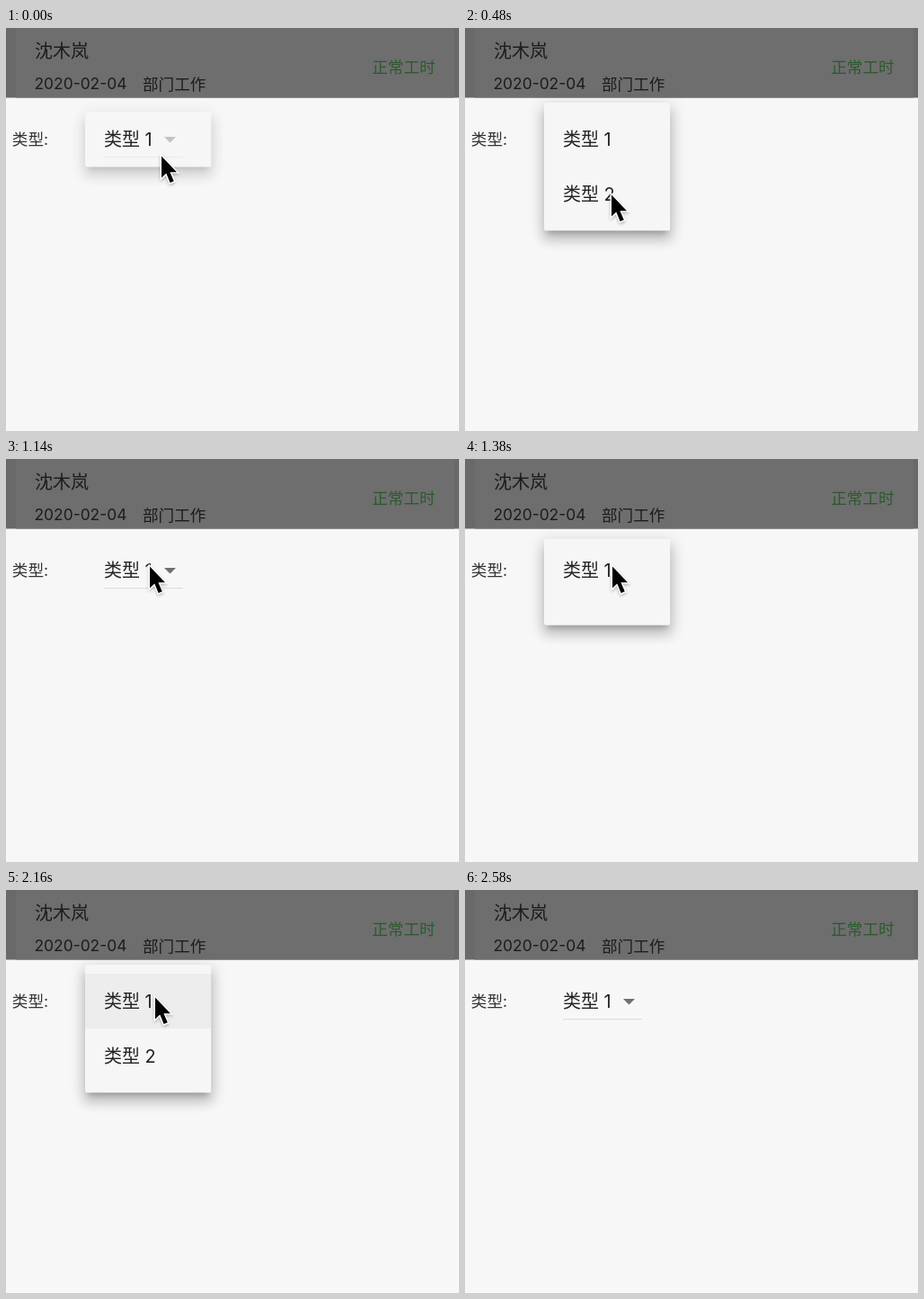
An HTML page for the animation above (2700 ms loop, 504 px wide and 448 px high).

```html
<!DOCTYPE html>
<html lang="zh-CN">
<head>
<meta charset="utf-8">
<title>Dropdown</title>
<style>
html, body { margin: 0; width: 100%; height: 100%; overflow: hidden; background: #f7f7f7; }
svg { display: block; width: 504px; height: 448px; }
text { font-family: Inter, "Noto Sans CJK SC", "Noto Sans CJK", sans-serif; white-space: pre; }
.item { font-size: 20px; fill: #222; }
.small { font-size: 17.6px; }
</style>
</head>
<body>
<svg viewBox="0 0 504 448">
  <defs>
    <filter id="near" filterUnits="userSpaceOnUse" x="40" y="40" width="240" height="250"><feGaussianBlur stdDeviation="3.2"/></filter>
    <filter id="mid" filterUnits="userSpaceOnUse" x="40" y="40" width="240" height="250"><feGaussianBlur stdDeviation="6.4"/></filter>
    <filter id="far" filterUnits="userSpaceOnUse" x="40" y="40" width="240" height="250"><feGaussianBlur stdDeviation="8.9"/></filter>
    <filter id="soft" x="-50%" y="-50%" width="200%" height="200%"><feDropShadow dx="0" dy="1.5" stdDeviation="1.4" flood-opacity=".3"/></filter>
    <clipPath id="clip"><rect id="clipBox" x="88" width="140.5" rx="2.5"/></clipPath>
  </defs>

  <rect width="504" height="448" fill="#f7f7f7"/>
  <rect width="504" height="77.5" fill="#696969"/>
  <rect x="11" width="488" height="77.5" fill="#6e6e6e"/>
  <text x="32" y="33.3" font-size="20" fill="#1c1c1c">沈木岚</text>
  <text x="31.5" y="68.3" font-size="17.4" fill="#1c1c1c">2020-02-04</text>
  <text class="small" x="152" y="69" fill="#1c1c1c">部门工作</text>
  <text class="small" x="407.2" y="50.2" fill="#2c5a2e">正常工时</text>

  <text class="small" x="6.8" y="130.4" fill="#333">类型:</text>
  <text class="item" x="109" y="131.2">类型 1</text>
  <path d="M176 121H189L182.5 127.5Z" fill="#6f6f6f"/>
  <rect x="109" y="143" width="88" height="1.2" fill="#dedede"/>

  <g id="menu">
    <rect class="shade" data-dy="6.3" data-grow="-3.8" opacity=".2" filter="url(#near)"/>
    <rect class="shade" data-dy="10.2" data-grow="1.3" opacity=".14" filter="url(#mid)"/>
    <rect class="shade" data-dy="3.8" data-grow="2.5" opacity=".12" filter="url(#far)"/>
    <g clip-path="url(#clip)">
      <rect x="88" y="83" width="140.5" height="142.5" fill="#f6f6f6"/>
      <rect id="glow1" x="88" y="93" width="140.5" height="61"/>
      <rect id="glow2" x="88" y="154" width="140.5" height="61"/>
      <text class="item" x="109" y="131.2">类型 1</text>
      <text class="item" id="second" x="109" y="192.2">类型 2</text>
    </g>
  </g>

  <g id="cursor" filter="url(#soft)">
    <path d="M1 1.5V25.5L6.3 20.6L10.6 31L14.8 29.2L10.4 19.2H18Z" stroke="#fff" stroke-width="2.6" paint-order="stroke"/>
  </g>
</svg>
<script>
const LOOP = 2700, STEP = 60;
const $ = id => document.getElementById(id);
const shades = [...document.querySelectorAll('.shade')];
const clamp = v => Math.min(1, Math.max(0, v));
const ramp = (v, a, b) => clamp((v - a) / (b - a));
const mix = (a, b, p) => a + (b - a) * p;
const ease = p => p * p * (3 - 2 * p);

// Pointer path: time, x, y
const path = [
  [0, 172, 141], [120, 172, 143], [420, 162, 184], [600, 162, 184],
  [840, 164, 127], [1140, 159, 118], [1260, 159, 118], [1500, 167, 118],
  [1920, 167, 118], [2160, 165, 118], [2280, 164, 121], [2400, 160, 161],
  [2460, 152, 272], [2520, 148, 398]
];

// Each opening: menu start, fade-out start
const opens = [{ start: -47, end: 960 }, { start: 1273, end: 2235 }];

function pointer(t) {
  const i = path.findIndex(k => k[0] > t);
  if (i < 0) return path[path.length - 1].slice(1);
  const [a, b] = [path[i - 1], path[i]];
  const p = ease(ramp(t, a[0], b[0]));
  return [mix(a[1], b[1], p), mix(a[2], b[2], p)];
}

function setBox(el, x, y, w, h) {
  Object.entries({ x, y, width: w, height: h }).forEach(([k, v]) => el.setAttribute(k, v));
}

function draw(t) {
  const { start, end } = t < 1200 ? opens[0] : opens[1];
  const p = clamp((t - start) / 300);
  const size = ramp(p, .25, .5);
  const top = mix(93, 83, size), height = mix(154.5, 225.5, size) - top;

  $('menu').setAttribute('opacity', ramp(p, 0, .25) * (1 - ramp(t, end, end + 100)));
  setBox($('clipBox'), 88, top, 140.5, height);
  shades.forEach(el => {
    const grow = +el.dataset.grow;
    setBox(el, 88 - grow, top + +el.dataset.dy - grow, 140.5 + 2 * grow, height + 2 * grow);
  });
  $('second').setAttribute('opacity', ramp(p, .786, 1));
  $('glow1').setAttribute('opacity', .034 * ramp(t, 1980, 2160));
  $('glow2').setAttribute('opacity', t < 1200 ? .046 * ramp(t, 540, 720) : 0);

  const [x, y] = pointer(t);
  $('cursor').setAttribute('transform', `translate(${x} ${y})`);
  $('cursor').setAttribute('visibility', t < 2580 ? 'visible' : 'hidden');
}

function tick() {
  const t = performance.now() % LOOP;
  draw(Math.floor(t / STEP) * STEP);
  requestAnimationFrame(tick);
}
tick();
</script>
</body>
</html>
```
